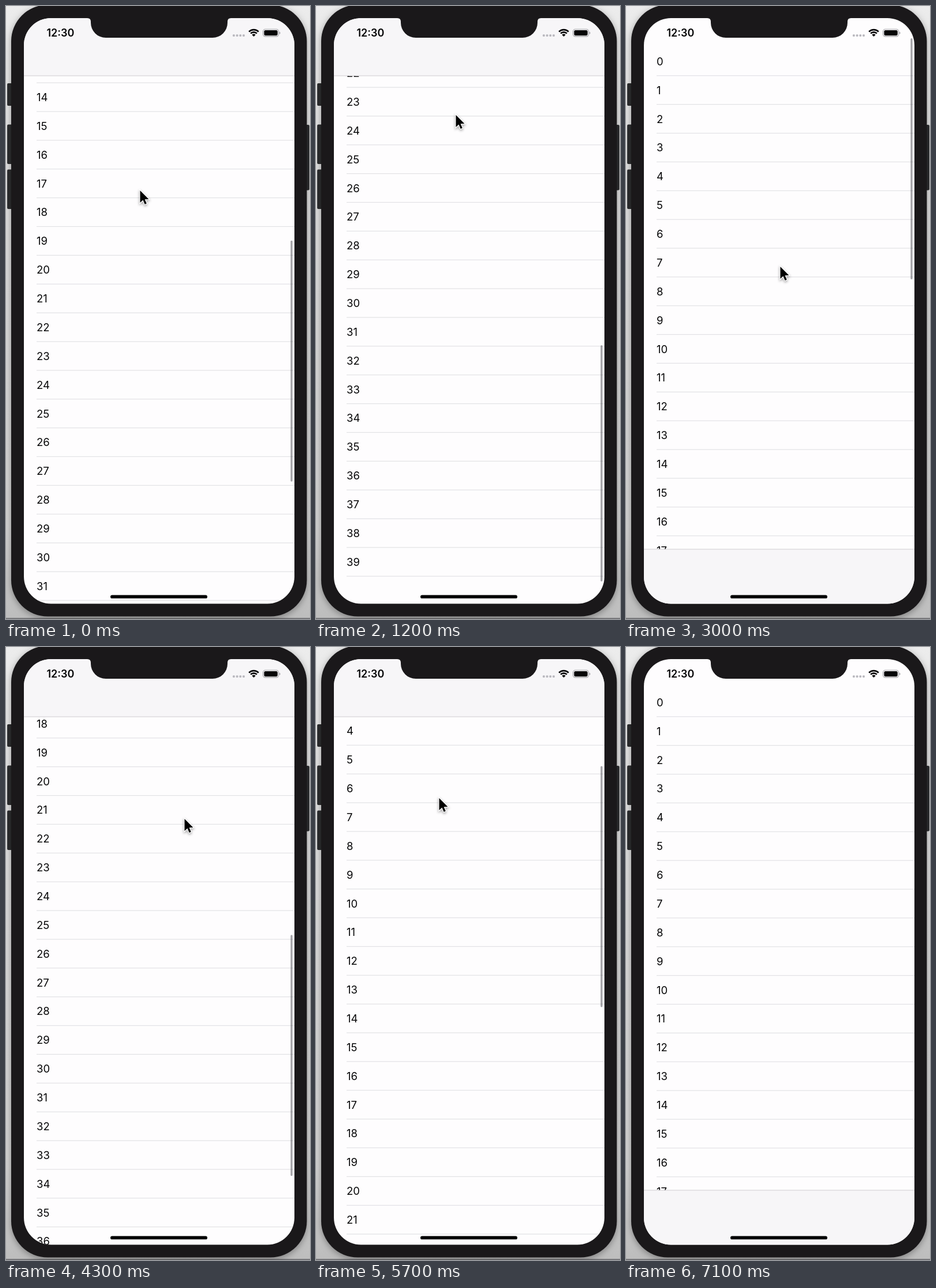
An HTML page with a canvas that plays this animation: 527x1063 px, repeating every 7200 ms.

```html
<!DOCTYPE html>
<html lang="en">
<head>
<meta charset="utf-8">
<title>Scrolling list</title>
<style>
html, body { margin: 0; width: 100%; height: 100%; overflow: hidden; background: #dcdcdc; }
canvas { display: block; width: 527px; height: 1063px; }
</style>
</head>
<body>
<canvas id="stage"></canvas>
<script>
const W = 527, H = 1063, LOOP = 7200, STEP = 100;
const ROW = 49.87, ROWS = 40;
const LEFT = 31, TOP = 21, RIGHT = 500, BOTTOM = 1036.5;
const NAV_BOTTOM = 121, TOOL_TOP = 942;
// Middle of row 0 at rest: without and with the navigation bar, and at the list's end
const HOME = 96, NAV_HOME = 146, END = -972.4;
const INK = '#060607', SHELL = '#1a181a', PANEL = '#f7f6f8', GREY = '#a3a2a7';

const canvas = document.getElementById('stage');
const ctx = canvas.getContext('2d');
const dpr = window.devicePixelRatio || 1;
canvas.width = W * dpr;
canvas.height = H * dpr;

const clamp = v => Math.max(0, Math.min(1, v));
const smooth = u => u * u * (3 - 2 * u);
const coast = u => 1 - (1 - u) ** 2;

// Each move: start, end, value reached, easing (smooth by default)
const scrollMoves = [
  [0, 600, -722, coast],
  [600, 1000, END - 14],
  [1050, 1400, END],
  [1400, 2300, NAV_HOME],
  [2300, 2900, HOME],
  [3300, 3800, -300],
  [3900, 4450, -802, coast],
  [4450, 5650, -54, coast],
  [5700, 6150, NAV_HOME],
  [6150, 6900, HOME]
];
const pointerMoves = [
  [0, 500, [248, 450]],
  [600, 950, [242, 189]],
  [1250, 1600, [-40, 480]],
  [1700, 1850, [275, 262]],
  [1950, 2300, [267, 452]],
  [3000, 3300, [295, 700]],
  [3300, 3800, [309, 298]],
  [4350, 4700, [570, 560]],
  [5400, 5650, [213, 262]],
  [5750, 6200, [201, 444]],
  [6400, 7000, [270, 1100]]
];
const barMoves = [[2300, 0], [3400, 1], [6150, 0]].map(([t, v]) => [t, t + 175, v]);

function glide(t, value, moves) {
  for (const [from, to, goal, ease = smooth] of moves) {
    const u = ease(clamp((t - from) / (to - from)));
    value += (goal - value) * u;
  }
  return value;
}

const axis = i => pointerMoves.map(([from, to, goal]) => [from, to, goal[i]]);
const pointerX = axis(0), pointerY = axis(1);

function box(x, y, r, b, radius, fill) {
  ctx.beginPath();
  ctx.roundRect(x, y, r - x, b - y, radius);
  ctx.fillStyle = fill;
  ctx.fill();
}

function rect(x, y, w, h, fill) {
  ctx.fillStyle = fill;
  ctx.fillRect(x, y, w, h);
}

function text(str, x, y, size, weight) {
  ctx.font = `${weight} ${size}px Inter, "Liberation Sans", sans-serif`;
  ctx.fillStyle = INK;
  ctx.fillText(str, x, y);
}

function drawBody() {
  const g = ctx.createLinearGradient(0, 0, 0, H);
  g.addColorStop(0, '#ececec');
  g.addColorStop(0.25, '#dedede');
  g.addColorStop(0.85, '#d2d2d2');
  g.addColorStop(1, '#bdbdbd');
  rect(0, 0, W, H, g);
  rect(0, 1061, W, 2, '#77777a');

  for (const [y, b] of [[134, 173], [205.5, 274], [283.5, 352]]) box(2, y, 12, b, 2, '#2c2d2f');
  box(515, 206, 526, 319.5, 2, '#2c2d2f');

  ctx.save();
  ctx.shadowColor = 'rgba(0,0,0,.35)';
  ctx.shadowBlur = 12 * dpr;
  ctx.shadowOffsetY = 3 * dpr;
  box(9, -2, 521.5, 1058.5, 63, SHELL);
  ctx.restore();
}

function drawList(top) {
  for (let i = 0; i < ROWS; i++) {
    const y = top + i * ROW;
    text(String(i), 53, y + 6.8, 18.5, 400);
    rect(53, y + 24.2, RIGHT - 53, 1.2, '#e2e2e5');
  }
}

function drawScroller(top, nav, t) {
  const rest = nav ? NAV_HOME : HOME, start = nav ? 124 : 56;
  const over = Math.max(0, top - rest), under = Math.max(0, END - top);
  const y = start + (over ? Math.min(7, over * 0.16) : (rest - top) * 0.412);
  ctx.globalAlpha = 1 - clamp((t - 6800) / 250);
  box(493.4, y, 496.6, Math.min(y + 418 - over - under, 1000), 1.6, 'rgba(30,30,38,.42)');
  ctx.globalAlpha = 1;
}

function drawPanel(y, b, edge) {
  rect(LEFT, y, RIGHT - LEFT, b - y, PANEL);
  rect(LEFT, edge - 0.5, RIGHT - LEFT, 1, '#cfced2');
}

function drawBars(shown) {
  const navBottom = NAV_BOTTOM - 110 * (1 - shown);
  const toolTop = TOOL_TOP + (BOTTOM + 1 - TOOL_TOP) * shown;
  drawPanel(Math.min(TOP, navBottom), navBottom, navBottom);
  drawPanel(toolTop, BOTTOM + 1, toolTop);
}

function drawStatus() {
  text('12:30', 70.5, 53, 18, 600);
  for (let i = 0; i < 4; i++) box(393 + i * 5.7, 49.3, 396.8 + i * 5.7, 53.1, 1.4, '#b9b8be');

  // Wi-Fi: two arcs over a wedge
  const cx = 429.5, cy = 53, a = Math.PI / 4;
  ctx.strokeStyle = ctx.fillStyle = INK;
  ctx.lineWidth = 2.7;
  for (const r of [11.8, 7.6]) {
    ctx.beginPath();
    ctx.arc(cx, cy, r, -Math.PI + a, -a);
    ctx.stroke();
  }
  ctx.beginPath();
  ctx.moveTo(cx, cy);
  ctx.arc(cx, cy, 4.4, -Math.PI + a, -a);
  ctx.fill();

  ctx.beginPath();
  ctx.roundRect(445.6, 40.3, 27, 12.6, 3.8);
  ctx.strokeStyle = GREY;
  ctx.lineWidth = 1.1;
  ctx.stroke();
  box(447.4, 42, 470.8, 51.2, 2.3, INK);
  box(473.8, 44.5, 475.4, 48.7, [0, 1.5, 1.5, 0], GREY);
}

function drawNotch() {
  const l = 147, r = 384, b = 55, ear = 6, c = 26;
  ctx.beginPath();
  ctx.moveTo(l - ear, TOP - 2);
  ctx.lineTo(l - ear, TOP);
  ctx.quadraticCurveTo(l, TOP, l, TOP + ear);
  ctx.arcTo(l, b, r, b, c);
  ctx.arcTo(r, b, r, TOP, c);
  ctx.lineTo(r, TOP + ear);
  ctx.quadraticCurveTo(r, TOP, r + ear, TOP);
  ctx.lineTo(r + ear, TOP - 2);
  ctx.fillStyle = SHELL;
  ctx.fill();
}

function drawPointer(x, y) {
  ctx.save();
  ctx.translate(x + 0.5, y);
  ctx.scale(1.24, 1.24);
  ctx.beginPath();
  ctx.moveTo(0, 0);
  for (const [px, py] of [[0, 17], [4, 13.3], [6.6, 19.3], [9.1, 18.2], [6.5, 12.3], [12, 12]]) ctx.lineTo(px, py);
  ctx.closePath();
  ctx.shadowColor = 'rgba(0,0,0,.4)';
  ctx.shadowBlur = 4 * dpr;
  ctx.shadowOffsetY = 2 * dpr;
  ctx.strokeStyle = '#fff';
  ctx.lineWidth = 2;
  ctx.stroke();
  ctx.shadowColor = 'transparent';
  ctx.fillStyle = '#000';
  ctx.fill();
  ctx.restore();
}

function draw(t) {
  const top = glide(t, -540, scrollMoves), shown = glide(t, 1, barMoves);
  ctx.setTransform(dpr, 0, 0, dpr, 0, 0);
  drawBody();
  ctx.save();
  box(LEFT, TOP, RIGHT, BOTTOM, 47, '#fefdfe');
  ctx.clip();
  drawList(top);
  drawScroller(top, shown > 0.5, t);
  drawBars(shown);
  drawStatus();
  box(181, 1021.5, 349, 1027.3, 2.9, '#000');
  ctx.restore();
  drawNotch();
  drawPointer(glide(t, 232, pointerX), glide(t, 320, pointerY));
}

const begin = performance.now();
function tick() {
  const t = (performance.now() - begin) % LOOP;
  draw(Math.floor(t / STEP) * STEP);
  requestAnimationFrame(tick);
}
tick();
</script>
</body>
</html>
```
